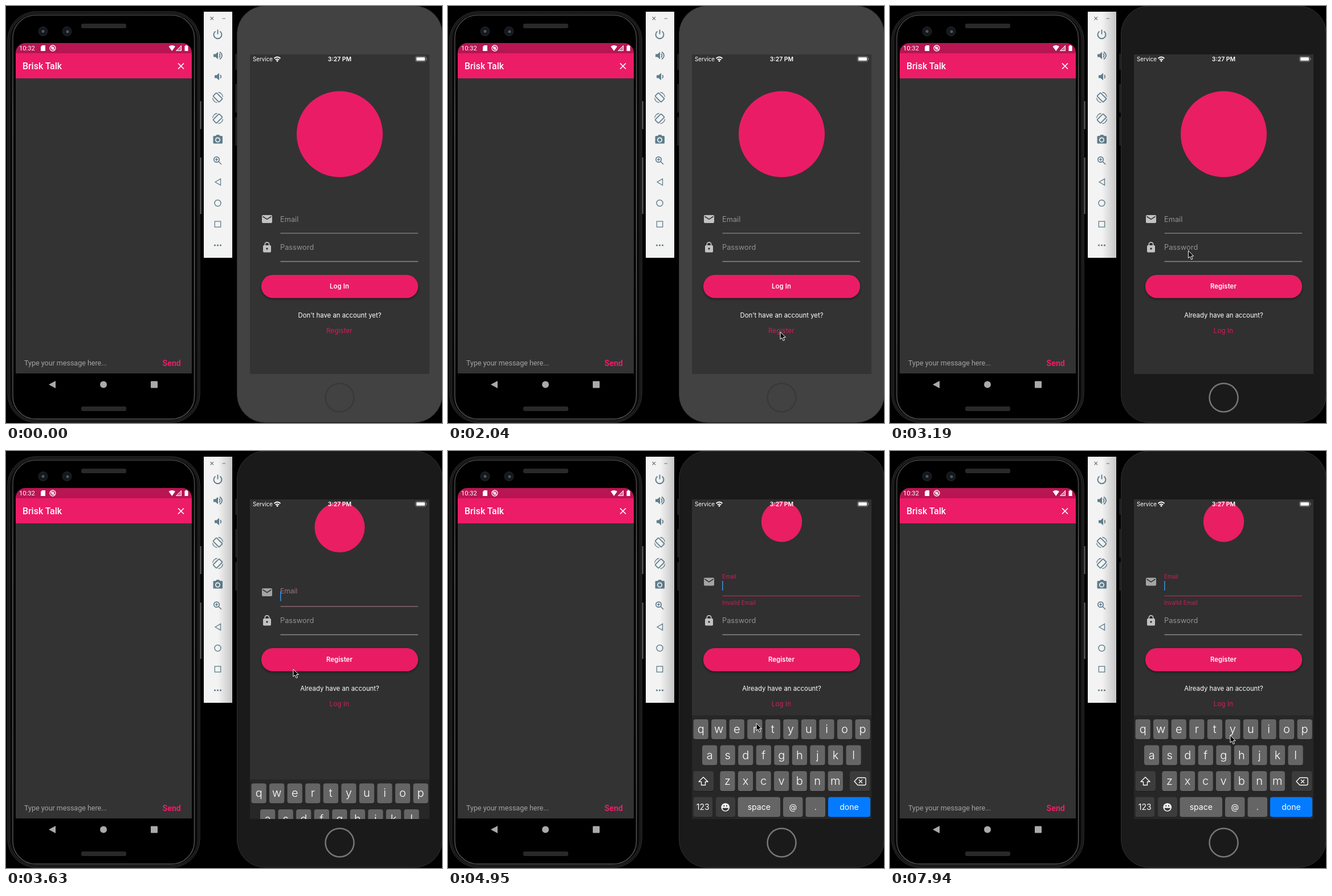
Recreate the animation shown at these times as an HTML page. Size 765 by 732 pixels, loop 8000 ms.

```html
<!DOCTYPE html>
<html lang="en">
<head>
<meta charset="utf-8">
<title>Two phones</title>
<style>
html, body { margin: 0; width: 100%; height: 100%; overflow: hidden; background: #000; }
svg { display: block; width: 765px; height: 732px; }
text { font-family: Inter, "Open Sans", sans-serif; fill: #fff; }
.droid text { font-family: Roboto, sans-serif; }
.mid { text-anchor: middle; }
.field { font-size: 12.8px; fill: #929292; }
.small { font-size: 11.3px; letter-spacing: .03px; }
.link { font-size: 11.3px; letter-spacing: .25px; fill: #d81b60; }
.btn { font-size: 11.3px; font-weight: 600; letter-spacing: .1px; }
.key text { text-anchor: middle; font-size: 20px; font-weight: 300; }
.key .word { font-size: 14px; font-weight: 400; }
.tools { fill: none; stroke: #607d8b; stroke-width: 1.7; }
.tools .solid { fill: #607d8b; stroke: none; }
</style>
</head>
<body>
<svg viewBox="0 0 765 732" xmlns="http://www.w3.org/2000/svg">
  <defs>
    <clipPath id="screen"><rect x="428" y="85" width="315" height="561"/></clipPath>
    <clipPath id="droidScreen"><rect x="17" y="65" width="309" height="620" rx="17"/></clipPath>
    <linearGradient id="edge"><stop offset="0" stop-opacity="0"/><stop offset="1" stop-opacity=".15"/></linearGradient>
    <linearGradient id="shade"><stop offset=".5" stop-opacity="0"/><stop offset="1" stop-opacity=".19"/></linearGradient>
    <linearGradient id="metal" x2="0" y2="1">
      <stop offset="0" stop-color="#444"/><stop offset=".25" stop-color="#707070"/>
      <stop offset=".75" stop-color="#686868"/><stop offset="1" stop-color="#555"/>
    </linearGradient>
    <filter id="drop" x="-10%" y="-40%" width="120%" height="190%">
      <feDropShadow dx="0" dy="2" stdDeviation="2" flood-opacity=".45"/>
    </filter>
    <g id="mail"><path fill="#c2c2c2" d="M451 367h14q2 0 2 2v10q0 2-2 2h-14q-2 0-2-2v-10q0-2 2-2z"/>
      <path d="M450.5 369.5l7.500 4.800 7.500-4.800" fill="none" stroke="#333" stroke-width="1.600"/></g>
    <g id="lock"><rect x="451" y="420" width="14" height="12.500" rx="1.700" fill="#c2c2c2"/>
      <path d="M454.300 421v-2.500a3.700 3.700 0 0 1 7.400 0v2.500" fill="none" stroke="#c2c2c2" stroke-width="1.700"/>
      <circle cx="458" cy="426" r="1.700" fill="#333"/></g>
    <g id="turn"><rect x="-4.200" y="-7.500" width="8.400" height="15" rx="1" transform="rotate(-45)"/>
      <path d="M1 -9a9 9 0 0 1 8 8M-1 9a9 9 0 0 1-8-8" stroke-width="1.300"/></g>
    <path id="speaker" d="M0 -2.500h3.500l4.500-4v13l-4.500-4h-3.500z" fill="#607d8b" stroke="none"/>
  </defs>

  <g class="droid">
    <path d="M341.500 167v49M341.500 266v99" stroke="#555" stroke-width="2.500"/>
    <rect x="3" y="10" width="337" height="721" rx="50" fill="#0c0c0c" stroke="#3c3c3c"/>
    <rect x="6" y="13" width="331" height="715" rx="47" fill="#0a0a0a" stroke="#222" stroke-width="2"/>
    <rect x="12" y="16" width="318.500" height="709" rx="40" fill="#000" stroke="url(#metal)" stroke-width="1.300"/>
    <rect x="132" y="31" width="79" height="8" rx="3" fill="#292929"/>
    <rect x="132" y="703" width="79" height="8" rx="3" fill="#292929"/>
    <g fill="#15181c" stroke="#24282d"><circle cx="65" cy="44.500" r="8"/><circle cx="107" cy="44.500" r="8"/></g>
    <g fill="#4c5864"><circle cx="65" cy="44.500" r="2.500"/><circle cx="108" cy="45" r="2.500"/></g>
    <g clip-path="url(#droidScreen)">
      <path fill="#333" d="M17 127h309v518H17z"/>
      <path fill="#b81553" d="M17 65h309v18H17z"/>
      <path fill="#ec1c67" d="M17 83h309v44H17z"/>
    </g>
    <text x="23" y="78" font-size="11.200">10:32</text>
    <path fill="#fff" d="M63.500 69h5.500v10h-8v-7.500zM285.500 71q5.500-4 11.500 0l-5.800 8zM313.500 70h1.500v-1.200h3v1.200h1.500v9h-6z"/>
    <path d="M298.500 78.500l9-9v9z" fill="#fff" fill-opacity=".4" stroke="#fff"/>
    <g fill="none" stroke="#fff" stroke-width="1.300"><circle cx="82" cy="74" r="5"/><circle cx="82" cy="74" r="2"/><path d="M78.500 71l7 6.500"/></g>
    <text x="29" y="111.300" font-size="15.900" font-weight="500">Brisk Talk</text>
    <path d="M302 100.500l10 10m0-10l-10 10" stroke="#fff" stroke-width="1.700"/>
    <text x="32" y="631" font-size="12.500" style="fill:#a3a3a3">Type your message here...</text>
    <text x="274.500" y="632" font-size="14.200" font-weight="700" style="fill:#ec1c67">Send</text>
    <path d="M87 658v13l-12-6.500z" fill="#aaa"/><circle cx="171" cy="664.500" r="6" fill="#aaa"/>
    <rect x="254" y="658.500" width="12" height="12" rx="1" fill="#aaa"/>
  </g>

  <rect x="347" y="10" width="50" height="432" fill="#f3f3f3"/>
  <g class="tools">
    <path d="M358.500 19l5.500 5.500m0-5.500l-5.500 5.500M379.500 22h5.500" stroke="#777" stroke-width="1.100"/>
    <path d="M367.500 44.500a7 7 0 1 0 8 0M371.500 41.500v8" stroke-width="1.900"/>
    <use href="#speaker" x="364" y="87"/><path d="M374 83.500q3 3.500 0 7M375 80.500q8 6.500 0 13"/>
    <use href="#speaker" x="366" y="124"/><path d="M376 121q2.500 3 0 6"/>
    <use href="#turn" transform="translate(371.500 160.500)"/>
    <use href="#turn" transform="translate(371.500 197.500) scale(-1 1)"/>
    <path class="solid" d="M365 228h3l1.500-2h4.500l1.500 2h3q1.500 0 1.500 1.500v10.500q0 1.500-1.500 1.500h-13.500q-1.500 0-1.500-1.500v-10.500q0-1.500 1.500-1.500z"/>
    <circle cx="371.500" cy="235" r="3.700" stroke="#f3f3f3"/>
    <circle cx="369.500" cy="269.500" r="4.700"/><path d="M373 273l5 5M367 269.500h5M369.500 267v5" stroke-width="1.500"/>
    <path d="M376.500 303.500v11l-9.500-5.500z" stroke-width="1.300"/>
    <circle cx="371.500" cy="346" r="5.500" stroke-width="1.400"/>
    <rect x="366.300" y="378" width="10.400" height="10" stroke-width="1.300"/>
    <g class="solid"><circle cx="366.500" cy="420" r="1.600"/><circle cx="371.500" cy="420" r="1.600"/><circle cx="376.500" cy="420" r="1.600"/></g>
  </g>
  <rect id="toolShade" x="347" y="10" width="50" height="432" fill="url(#shade)"/>

  <path d="M403.500 84v28M403.500 137v50M403.500 195v50" stroke="#1d1d1d" stroke-width="3"/>
  <rect id="body" x="405.500" y="0" width="360" height="731" rx="49" stroke="#303030"/>
  <circle id="home" cx="585.500" cy="687.500" r="25" fill="none" stroke-width="2.500"/>

  <g clip-path="url(#screen)">
    <g id="login"></g>
    <g id="register"></g>
    <circle id="badge" cx="585.500"/>
    <g id="keys"></g>
    <text x="433" y="97" font-size="9.800">Service</text>
    <g fill="none" stroke="#fff" stroke-width="1.900"><path d="M470.500 92q5.500-4.800 11 0M472.800 94.500q3.200-2.600 6.400 0"/></g>
    <circle cx="476" cy="96.500" r="1.400" fill="#fff"/>
    <text class="mid" x="585.500" y="97" font-size="10.400" font-weight="600">3:27 PM</text>
    <rect x="718.500" y="88.500" width="18" height="9" rx="2.500" fill="none" stroke="#999" stroke-width=".8"/>
    <rect x="720" y="90" width="15" height="6" rx="1.300" fill="#fff"/><path d="M738 91.500v3" stroke="#999"/>
  </g>

  <path id="pointer" d="M0 0v13l3-2.700 2.200 5.200 2.300-1-2.200-5h4z" fill="#000" stroke="#fff" stroke-width="1"/>
</svg>
<script>
const $ = id => document.getElementById(id);
const set = (id, attrs) => { for (const k in attrs) $(id).setAttribute(k, attrs[k]); };
const clamp = v => Math.max(0, Math.min(1, v));
const mix = (a, b, p) => a + (b - a) * p;
const rgb = (a, b, p) => `rgb(${a.map((v, i) => Math.round(mix(v, b[i], p)))})`;
const GREY = [146, 146, 146], PINK = [200, 31, 90];

const form = (action, question, link, pink) => `
  <use href="#lock"/>
  <text class="field" x="481" y="428.300">Password</text>
  <path d="M481.500 448.500h241.500" stroke="#8a8a8a" stroke-width="1.300"/>
  <rect x="448" y="472" width="275" height="40.500" rx="20.250" fill="${pink}" filter="url(#drop)"/>
  <text class="btn mid" x="585" y="496">${action}</text>
  <text class="small mid" x="585.500" y="547">${question}</text>
  <text class="link mid" x="585" y="574.300">${link}</text>`;
const emailField = (label, line) => `
  <use href="#mail" ${label && 'id="mailIcon"'}/>
  <text class="field" ${label} x="481" y="378.500">Email</text>
  <path ${line} d="M481.500 398.800h241.500" stroke="#8a8a8a" stroke-width="1.300"/>`;

$('login').innerHTML = `<rect id="loginBg" x="428" y="85" width="450" height="561"/>`
  + emailField('', '') + form('Log In', "Don't have an account yet?", 'Register', '#eb1c66');
$('register').innerHTML = `
  <rect x="412" y="85" width="16" height="561" fill="url(#edge)"/>
  <rect x="428" y="85" width="315" height="561" fill="#303030"/>
  <g id="email">${emailField('id="label"', 'id="line"')}
    <rect id="caret" x="481" y="372.500" width="1.700" height="17" fill="#3b87cf"/>
    <text id="error" x="481" font-size="9.800" letter-spacing=".12" style="fill:#c81f5a">Invalid Email</text>
  </g>
  <g id="lower">${form('Register', 'Already have an account?', 'Log In', '#e91e63')}</g>`;

// Keyboard in its open position
const key = (x, y, w, label, fill = '#656565', cls = '') => `
  <rect x="${x}" y="${y + 1}" width="${w}" height="35" rx="4" fill="#191919"/>
  <rect x="${x}" y="${y}" width="${w}" height="35" rx="4" fill="${fill}"/>
  <text class="${cls}" x="${x + w / 2}" y="${y + (cls ? 22.500 : 24)}">${label}</text>`;
const row = (letters, x, y) => [...letters].map((c, i) => key(x + i * 31.55, y, 26.3, c)).join('');
const DARK = '#3c3c3c';
set('keys', { class: 'key' });
$('keys').innerHTML = '<path fill="#272727" d="M428 464h315v182H428z"/>'
  + row('qwertyuiop', 430.5, 471) + row('asdfghjkl', 446, 516.5) + row('zxcvbnm', 477.3, 562)
  + key(430.5, 562, 35.5, '', DARK) + key(705, 562, 35.5, '', DARK)
  + key(430.5, 607.5, 33.5, '123', DARK, 'word') + key(470, 607.5, 34, '', DARK)
  + key(508.5, 607.5, 74.5, 'space', '#656565', 'word') + key(588, 607.5, 34.5, '@', '#656565', 'word')
  + key(627.5, 607.5, 34.5, '.', '#656565', 'word') + key(667, 607.5, 74, 'done', '#047bff', 'word')
  + `<g fill="none" stroke="#fff" stroke-width="1.300" stroke-linejoin="round">
      <path d="M448 572.500l8 8h-4.500v6h-7v-6h-4.500zM719 573.500h12q2 0 2 2v9q0 2-2 2h-12l-6-6.500zM721 577l6 6m0-6l-6 6"/></g>
    <circle cx="486.700" cy="625.500" r="7.300" fill="#fff"/>
    <path d="M481.500 626.500h10.400a5.200 5 0 0 1-10.400 0z" fill="${DARK}"/>
    <circle cx="484.300" cy="623" r="1.200" fill="${DARK}"/><circle cx="489" cy="623" r="1.200" fill="${DARK}"/>`;

// Pointer path: time, x, y
const PATH = [
  [630, 714, 500], [890, 640, 470], [1130, 564, 444], [1420, 592, 489], [1500, 589, 488], [1610, 590, 489],
  [2035, 583, 572], [2660, 583, 572], [3355, 504, 383], [4350, 504, 383], [4930, 541, 478],
  [6740, 541, 478], [7200, 543, 488], [7570, 545, 494], [7600, 546, 495], [7780, 575, 504], [7930, 597, 499]
];
function pointerAt(t) {
  const i = PATH.findIndex(p => p[0] > t);
  if (i < 1) return PATH[i < 0 ? PATH.length - 1 : 0].slice(1);
  const [a, b] = [PATH[i - 1], PATH[i]], p = (t - a[0]) / (b[0] - a[0]);
  return [mix(a[1], b[1], p), mix(a[2], b[2], p)];
}

// Cubic bezier easing (.35, .91, .33, .97)
function slideEase(x) {
  const curve = (u, a, b) => 3 * u * (1 - u) ** 2 * a + 3 * u * u * (1 - u) * b + u ** 3;
  let lo = 0, hi = 1;
  for (let i = 0; i < 20; i++) {
    const m = (lo + hi) / 2;
    if (curve(m, .35, .33) < x) lo = m; else hi = m;
  }
  return curve(lo, .91, .97);
}

function caretOpacity(t) {
  const since = t - 4245;
  if (since < 0) return 1;
  const p = 1 - (1 - clamp(since % 500 / 250)) ** 3;
  return Math.floor(since / 500) % 2 ? p : 1 - p;
}

const STEP = 88.07;
function draw(now) {
  const t = 630 + Math.floor((now - 618) / STEP) * STEP;
  const active = t > 2200, focused = t > 3580, invalid = t > 3900;

  set('body', { fill: active ? '#1a1a1a' : '#424242' });
  set('home', { stroke: active ? '#777' : '#393939' });
  set('toolShade', { opacity: active ? 1 : 0 });
  set('loginBg', { fill: active ? '#303030' : '#333' });

  const slid = slideEase(clamp((t - 2266) / 400)), dx = 315 * (1 - slid);
  set('login', { transform: `translate(${-105 * slid} 0)` });
  set('register', { transform: `translate(${dx} 0)`, visibility: slid > 0 ? 'visible' : 'hidden' });

  set('badge', {
    cy: invalid ? 124 : focused ? 134 : 225,
    r: invalid ? 35.7 : focused ? 44 : 75.5,
    fill: active ? '#e91e63' : '#eb1c66'
  });

  set('email', { transform: `translate(0 ${invalid ? -144.5 : focused ? -126 : 0})` });
  set('lower', { transform: `translate(0 ${focused ? -126 : 0})` });
  const lift = clamp((t - 3584) / 167), size = mix(12.8, 9.8, lift);
  set('label', { y: mix(374, 365.3, lift) + size * .36, style: `font-size:${size}px;fill:${rgb(GREY, PINK, lift)}` });
  set('line', { stroke: rgb([138, 138, 138], PINK, lift) });
  set('mailIcon', { opacity: focused ? .8 : 1 });
  set('caret', { opacity: focused ? caretOpacity(t) : 0 });
  const fade = clamp((t - 3912) / 167);
  set('error', { y: mix(411.5, 414.7, fade), opacity: fade });

  const drop = focused ? 113 * Math.exp((3624 - t) / 75) : 190;
  set('keys', { transform: `translate(0 ${drop < .5 ? 0 : drop})` });

  const [x, y] = pointerAt(t);
  set('pointer', { transform: `translate(${x} ${y})`, visibility: t >= 629 ? 'visible' : 'hidden' });
}

const start = performance.now();
function tick() {
  draw((performance.now() - start) % 8000);
  requestAnimationFrame(tick);
}
tick();
</script>
</body>
</html>
```
